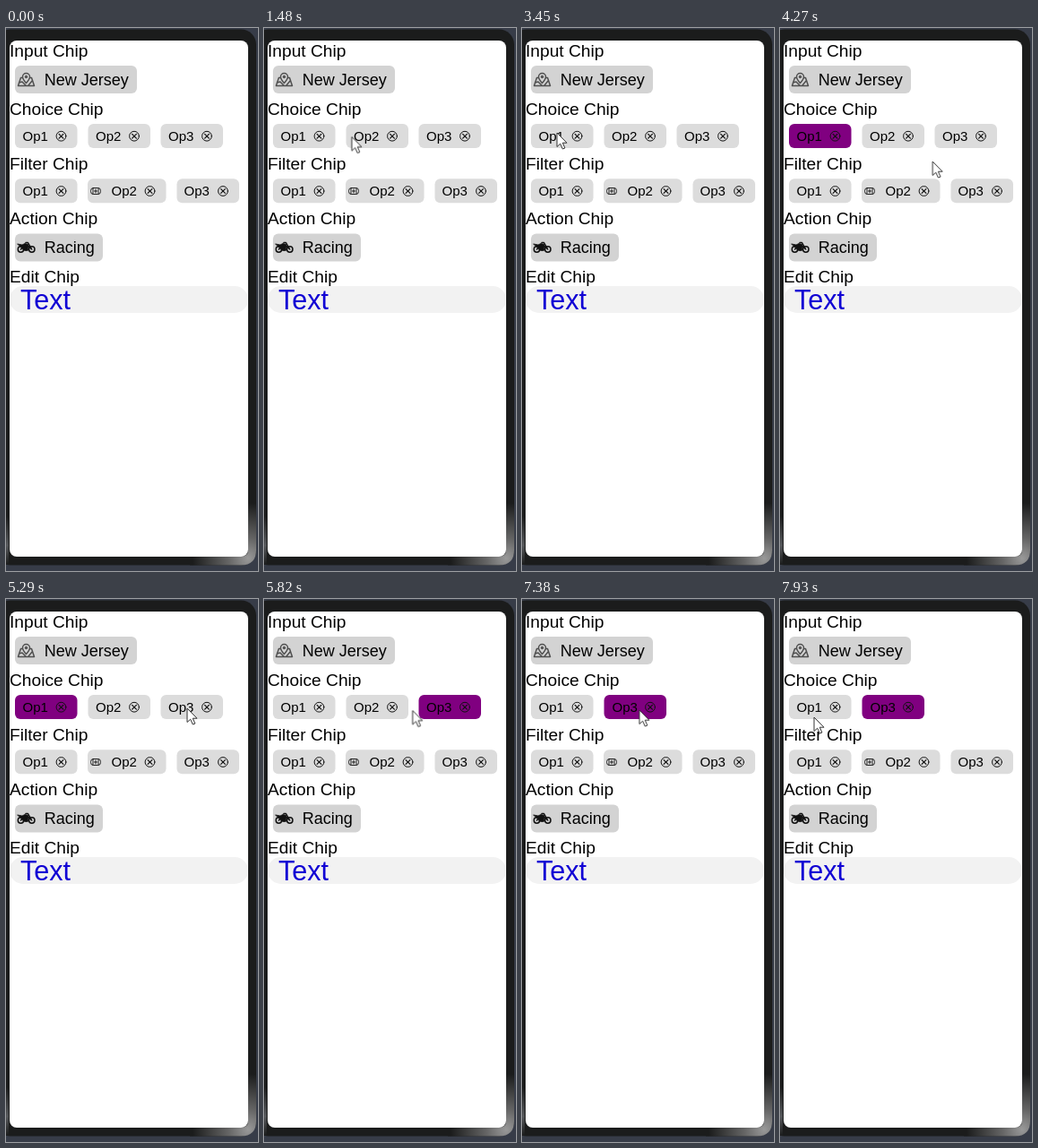
Animation of 281x606 px, one loop 8000 ms. Source, as an HTML page:

```html
<!DOCTYPE html>
<html lang="en">
<head>
<meta charset="utf-8">
<title>Chips</title>
<style>
html, body { margin: 0; width: 100%; height: 100%; overflow: hidden; background: #373c48; }
svg { display: block; width: 100%; height: 100%; font-family: "Liberation Sans", Arial, sans-serif; }
.heading { font-size: 19.2px; }
.large { font-size: 18px; }
.option { font-size: 15px; }
.edit { font-size: 30.6px; fill: #1000d4; }
.chip { fill: #dcdcdc; }
.icon { fill: none; stroke: #111; stroke-linecap: round; stroke-linejoin: round; }

/* One percent of the loop is 80 ms. */
.switch { animation: 8s step-end infinite; }
#first { animation-name: first; }
#second { animation-name: second; }
#third { animation-name: third; }
#before { animation-name: hide-before; }
#after { animation-name: show-after; }
#last { animation-name: remove-last; }
#cursor { animation: travel 8s linear infinite, appear 8s step-end infinite; }

@keyframes first { 0% { fill: #dcdcdc } 46.5% { fill: #800080 } 67.75%, 100% { fill: #dcdcdc } }
@keyframes second { 0% { fill: #dcdcdc } 88%, 100% { fill: #800080 } }
@keyframes third { 0% { fill: #dcdcdc } 69.5%, 100% { fill: #800080 } }
@keyframes hide-before { 0% { opacity: 1 } 88%, 100% { opacity: 0 } }
@keyframes show-after { 0% { opacity: 0 } 88%, 100% { opacity: 1 } }
@keyframes remove-last { 0% { opacity: 1 } 92.25%, 100% { opacity: 0 } }
@keyframes appear { 0% { opacity: 0 } 6.625%, 100% { opacity: 1 } }
@keyframes travel {
  0%, 6.625% { transform: translate(254px, 577px) }
  9% { transform: translate(215px, 430px) }
  12% { transform: translate(162px, 255px) }
  14% { transform: translate(131px, 178px) }
  16%, 16.5% { transform: translate(117px, 149px) }
  18.5% { transform: translate(98px, 122px) }
  19.375%, 21.5% { transform: translate(86px, 86px) }
  26.25%, 27.5% { transform: translate(81px, 70px) }
  32.125% { transform: translate(48px, 82px) }
  36.5%, 37.5% { transform: translate(37px, 108px) }
  38.125%, 41.5% { transform: translate(37px, 121px) }
  43.125%, 46% { transform: translate(39px, 117px) }
  48.5% { transform: translate(72px, 56px) }
  50% { transform: translate(105px, 62px) }
  52% { transform: translate(145px, 118px) }
  53.375% { transform: translate(170px, 149px) }
  56% { transform: translate(205px, 148px) }
  57% { transform: translate(216px, 135px) }
  61.125%, 69% { transform: translate(202px, 122px) }
  72% { transform: translate(174px, 124px) }
  75.375%, 80% { transform: translate(137px, 126px) }
  80.375%, 82.5% { transform: translate(139px, 126px) }
  84.5%, 90.5% { transform: translate(142px, 124px) }
  92.25% { transform: translate(131px, 124px) }
  95.5% { transform: translate(84px, 129px) }
  99.125%, 100% { transform: translate(38px, 132px) }
}
</style>
</head>
<body>
<svg viewBox="0 0 281 606" preserveAspectRatio="none">
  <defs>
    <radialGradient id="shine" gradientUnits="userSpaceOnUse" cx="270" cy="592" r="62">
      <stop offset="0" stop-color="#999"/>
      <stop offset=".35" stop-color="#666"/>
      <stop offset="1" stop-color="#1b1c1c"/>
    </radialGradient>
    <linearGradient id="edge" x2="0" y2="1">
      <stop offset="0" stop-color="#1b1c1c"/>
      <stop offset=".6" stop-color="#55575a"/>
      <stop offset="1" stop-color="#1b1c1c"/>
    </linearGradient>
    <g id="close" class="icon" stroke-width="1">
      <circle r="5.4"/>
      <path d="M-2.4-2.4 2.4 2.4M2.4-2.4-2.4 2.4" stroke-width="1.2"/>
    </g>
    <rect id="chip" width="69.5" height="27" rx="6"/>
  </defs>

  <rect width="281" height="606" fill="#373c48"/>
  <rect x="-12" y="1.5" width="291" height="598" rx="17" fill="#1b1c1c"/>
  <path d="M262 599.5H205V590H262Q270 590 270 582V530H279V582.500Q279 599.500 262 599.500Z" fill="url(#shine)"/>
  <rect y="545" width="3" height="54" fill="url(#edge)"/>
  <rect x="4" y="14" width="266" height="576" rx="8" fill="#fff"/>

  <g class="heading">
    <text x="4" y="32">Input Chip</text>
    <text x="4" y="97">Choice Chip</text>
    <text x="4" y="158">Filter Chip</text>
    <text x="4" y="219">Action Chip</text>
    <text x="4" y="284">Edit Chip</text>
  </g>

  <g class="large">
    <rect x="10" y="42" width="136" height="31" rx="6" fill="#d3d3d3"/>
    <text x="42.700" y="64">New Jersey</text>
    <rect x="10" y="229.500" width="98" height="31" rx="6" fill="#d3d3d3"/>
    <text x="42.700" y="251">Racing</text>
  </g>

  <g class="icon" style="stroke: #505050" stroke-width="1.500">
    <path d="M19 55.500H16.500L13.500 64.500H31.500L28.500 55.500H26M14.500 61 18 60 22 64M25 64 29.500 58.500"/>
    <path d="M22.500 61.500Q18.500 57 18.500 54.500A4 4 0 0 1 26.500 54.500Q26.500 57 22.500 61.500Z" fill="#d3d3d3"/>
    <circle cx="22.500" cy="54.500" r="1"/>
  </g>

  <g class="icon" stroke-width="1.500">
    <circle cx="16.500" cy="247" r="3.200"/>
    <circle cx="28.800" cy="247" r="3.200"/>
    <path d="M16.500 247 20 243.500 24 248H21L18.500 243.500H25L28.800 247 24.500 239.500H22" />
    <path d="M13 241 18 242 21 240.500 25 241.500 24.500 248H20Z" fill="#111" stroke-width=".8"/>
  </g>

  <g class="option">
    <use href="#chip" id="first" class="chip switch" x="10" y="107"/>
    <text x="18.500" y="126">Op1</text>
    <use href="#close" x="61.500" y="120.700"/>

    <use href="#chip" id="second" class="chip switch" x="91.500" y="107"/>
    <text id="before" class="switch" x="100" y="126">Op2</text>
    <text id="after" class="switch" x="100.500" y="126">Op3</text>
    <use href="#close" x="143" y="120.700"/>

    <g id="last" class="switch">
      <use href="#chip" id="third" class="chip switch" x="172.500" y="107"/>
      <text x="181" y="126">Op3</text>
      <use href="#close" x="224" y="120.700"/>
    </g>

    <use href="#chip" class="chip" x="10" y="168.300"/>
    <text x="18.500" y="187">Op1</text>
    <use href="#close" x="61.500" y="182"/>

    <rect class="chip" x="91" y="168.300" width="87.500" height="27" rx="6"/>
    <g class="icon" stroke-width=".9">
      <rect x="94.500" y="178.500" width="11" height="7" rx="3"/>
      <path d="M97 178.500V185.500M103 178.500V185.500M98.500 182H101.500M100 180V184"/>
    </g>
    <text x="117.500" y="187">Op2</text>
    <use href="#close" x="160.500" y="182"/>

    <use href="#chip" class="chip" x="190.500" y="168.300"/>
    <text x="198.500" y="187">Op3</text>
    <use href="#close" x="242" y="182"/>
  </g>

  <rect x="4" y="288" width="266" height="30" rx="15" fill="#f2f2f2"/>
  <text class="edit" x="16" y="314">Text</text>

  <path id="cursor" d="M0 0V15.500L3.700 12.200 6.300 18 8.900 17 6.300 11.200H11Z" fill="#fff" stroke="#333" stroke-width="1"/>
</svg>
</body>
</html>
```
